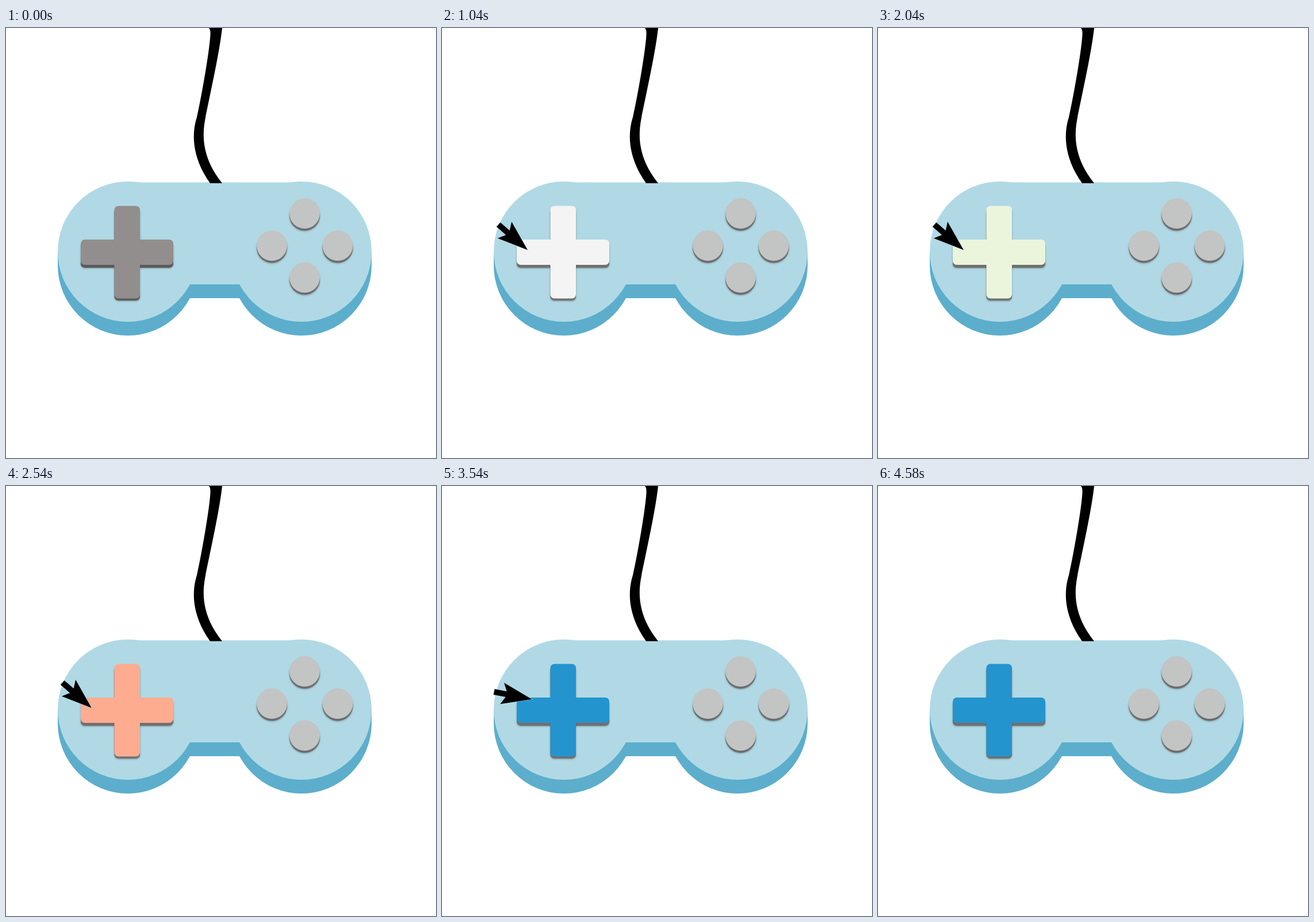
Animation, 748 px wide and 748 px high, one loop 4660 ms. Source, as an HTML page with a canvas:

```html
<!DOCTYPE html>
<html lang="en">
<head>
<meta charset="utf-8">
<title>Game controller</title>
<style>
html, body { margin: 0; width: 100%; height: 100%; overflow: hidden; background: #fff; }
canvas { display: block; width: 748px; height: 748px; }
</style>
</head>
<body>
<canvas id="stage" width="748" height="748"></canvas>
<script>
const ctx = document.getElementById('stage').getContext('2d');
const LOOP = 4660, STEP = 80, PRESS = 1040, LEAVE = 3540;
const REST_COLOR = '#928e8d';
const PRESSED = ['#f4f4f4', '#f9f2cd', '#ebf5dc', '#feac90', '#2494ce'];
const BUTTONS = [[519.5, 322.5], [462.5, 378.5], [577, 378.5], [519.5, 434]];
const CABLE = new Path2D('M353 0Q356 3 355.5 12C354 40 340 120 332 155' +
  'C324 180 321 222 355 270L376 270C340 225 341 185 347 156C353 125 372 40 376 0Z');
const ARROW = new Path2D('M33.5 0L-19.5 -18.8L-12 -5L-33.5 -5L-33.5 5L-12 5L-19 18.8Z');

function fill(color, path) {
  ctx.fillStyle = color;
  ctx.fill(path);
}

function disc(x, y, r, color) {
  const p = new Path2D();
  p.arc(x, y, r, 0, Math.PI * 2);
  fill(color, p);
}

function bar(x, y, w, h, color) {
  const p = new Path2D();
  p.roundRect(x, y, w, h, 7);
  fill(color, p);
}

function withShadow(draw) {
  ctx.save();
  ctx.shadowColor = 'rgba(50,50,50,.45)';
  ctx.shadowBlur = 3;
  ctx.shadowOffsetY = 1;
  draw();
  ctx.restore();
}

function bodyLayer(dy, color) {
  disc(212, 389 + dy, 122, color);
  disc(514, 389 + dy, 122, color);
  ctx.fillRect(212, 268.5 + dy, 302, 177.5);
}

function drawBody() {
  bodyLayer(24, '#5caecc');
  ctx.fillRect(90, 389, 546, 24);
  bodyLayer(0, '#b0d9e5');
}

function cross(dy, color) {
  bar(130, 368 + dy, 161, 44, color);
  bar(188.5, 309.5 + dy, 44.5, 161, color);
}

function drawCross(color, side) {
  withShadow(() => {
    bar(130, 373, 161, 44, side);
    bar(188.5, 313, 44.5, 161, side);
  });
  cross(0, color);
}

function drawButtons() {
  for (const [x, y] of BUTTONS) {
    withShadow(() => disc(x, y + 3.5, 26.5, '#6c6b6b'));
    disc(x, y, 26.5, '#c3c4c4');
  }
}

// Centre and heading of the pointer: glide in, rest, turn round and glide out.
function pointer(t) {
  if (t < LEAVE) {
    const q = Math.min(PRESS, Math.floor(t / STEP) * STEP);
    const left = (PRESS - q) / 400;
    return [123.5 - 36 * left ** 2.65, 364 - 38 * left ** 2.03, 41];
  }
  const q = Math.floor((t - LEAVE) / STEP) * STEP;
  const u = q / 480, turn = Math.min(1, u);
  return [123.5 - 73.5 * u * u, 364.5 - 28.5 * turn * turn, 11 - 191 * turn];
}

function drawPointer(t) {
  const [x, y, deg] = pointer(t);
  ctx.save();
  ctx.translate(x, y);
  ctx.rotate(deg * Math.PI / 180);
  ctx.strokeStyle = 'rgba(176,217,229,.8)';
  ctx.lineWidth = 1.4;
  ctx.stroke(ARROW);
  fill('#000', ARROW);
  ctx.restore();
}

function render(t) {
  ctx.fillStyle = '#fff';
  ctx.fillRect(0, 0, 748, 748);
  drawBody();
  fill('#000', CABLE);
  const pressed = t >= PRESS;
  const n = Math.min(PRESSED.length - 1, Math.floor((t - PRESS) / 500));
  drawCross(pressed ? PRESSED[n] : REST_COLOR, pressed ? '#717070' : '#5b5a5a');
  drawButtons();
  drawPointer(t);
}

const start = performance.now();
function tick() {
  render((performance.now() - start) % LOOP);
  requestAnimationFrame(tick);
}
tick();
</script>
</body>
</html>
```
